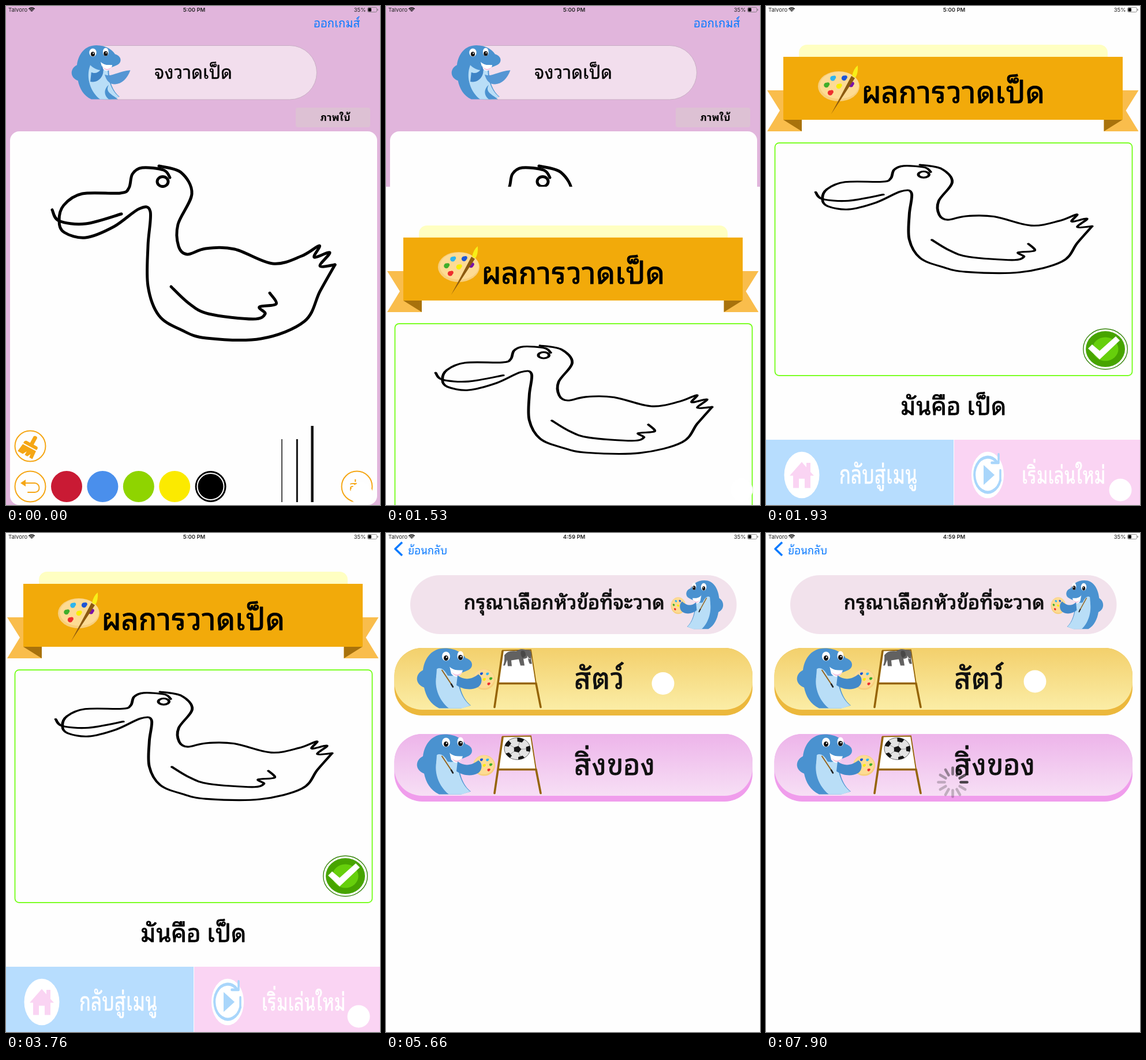
Recreate the animation shown at these times as an HTML page with a canvas. Size 648 px wide and 864 px high, loop 8 s.

```html
<!DOCTYPE html>
<html lang="th">
<head>
<meta charset="utf-8">
<style>
html, body { margin: 0; width: 100%; height: 100%; overflow: hidden; background: #fefefe; }
canvas { display: block; width: 648px; height: 864px; }
</style>
</head>
<body>
<canvas id="stage" width="648" height="864"></canvas>
<script>
const c = document.getElementById('stage').getContext('2d');
const LOOP = 8000, CUT = 5360, SLIDE = 1415, TAU = Math.PI * 2;
const THAI = "'Noto Sans Thai Looped','Noto Looped Thai',Loma,Garuda,'Noto Sans Thai','Noto Sans',sans-serif";
const LATIN = 'Inter,Roboto,sans-serif';
const WHITE = '#fefefe', BLUE = '#4a92d0', SKY = '#b9def7', ORANGE = '#f5a614', LINK = '#0a7aff';

function fill(color, d) { c.fillStyle = color; c.fill(new Path2D(d)); }
function line(color, w, d) { c.strokeStyle = color; c.lineWidth = w; c.stroke(new Path2D(d)); }
function rect(color, x, y, w, h) { c.fillStyle = color; c.fillRect(x, y, w, h); }
function paint(color, edge, w) {
  if (color) { c.fillStyle = color; c.fill(); }
  if (edge) { c.strokeStyle = edge; c.lineWidth = w; c.stroke(); }
}
function oval(x, y, rx, ry, color, edge, w = 2) {
  c.beginPath();
  c.ellipse(x, y, Math.abs(rx), ry, 0, 0, TAU);
  paint(color, edge, w);
}
function box(x, y, w, h, r, color, edge, lw = 1) {
  c.beginPath();
  c.roundRect(x, y, w, h, r);
  paint(color, edge, lw);
}
function group(x, y, sx, sy, draw) {
  c.save();
  c.translate(x, y);
  c.scale(sx, sy);
  draw();
  c.restore();
}

function text(s, x, y, size, { color = '#000', weight = 400, align = 'left', family = THAI, heavy = 0 } = {}) {
  c.font = `${weight} ${size}px ${family}`;
  c.fillStyle = c.strokeStyle = color;
  c.lineWidth = heavy;
  const put = (str, px, py) => {
    c.fillText(str, px, py);
    if (heavy) c.strokeText(str, px, py);
  };
  // A tone mark above a vowel is lifted clear of it
  const stacked = /([ก-ฮ])([ิีึืั])([่้])/;
  const hit = s.match(stacked), plain = s.replace(stacked, '$1$2');
  const width = c.measureText(plain).width;
  const left = x - (align === 'center' ? width / 2 : align === 'right' ? width : 0);
  put(plain, left, y);
  if (!hit) return;
  c.save();
  c.beginPath();
  c.rect(left, y - size * 2, width, size * 1.11);
  c.clip();
  put(hit[1] + hit[3], left + c.measureText(s.slice(0, hit.index)).width, y - size * .2);
  c.restore();
}

// Smooth path through a few "x,y" points
function curve(list) {
  const p = list.split(' ').map(s => s.split(',').map(Number));
  const at = i => p[Math.max(0, Math.min(p.length - 1, i))];
  let d = `M${p[0]}`;
  for (let i = 0; i < p.length - 1; i++) {
    const [a, b, e, f] = [at(i - 1), at(i), at(i + 1), at(i + 2)];
    const k = j => [b[j] + (e[j] - a[j]) / 6, e[j] - (f[j] - b[j]) / 6];
    const [x1, x2] = k(0), [y1, y2] = k(1);
    d += `C${x1},${y1} ${x2},${y2} ${e}`;
  }
  return d;
}
const front = curve('284,297 273,284 236,280 219,291 213,315 198,324 132,325 100,345 92,372 101,392 138,401 187,382 231,351 250,356 246,415 246,485 265,536 304,561 347,575 442,576 517,546 544,494 570,448');
const back = curve('570,448 544,450 561,427 534,435 543,415 512,433 462,446 396,421 346,420 314,430 299,416 298,378 322,325 303,288 265,277');
const mouth = curve('80,353 92,372 138,377 200,360');
const wing = curve('286,486 317,515 351,533 428,542 449,533 439,521 468,516 457,497');
function drawDuck() {
  for (const d of [front, back, mouth, wing]) line('#000', 5, d);
  oval(271.5, 304, 9.5, 8.5, null, '#000', 5);
}

function statusBar(clock) {
  const small = { color: '#222', family: LATIN };
  text('Talvoro', 4, 10, 9.5, small);
  c.lineCap = 'butt';
  for (const r of [2, 4.6, 7.2]) {
    c.beginPath();
    c.arc(44.5, 10.3, r, -TAU * .375, -TAU * .125);
    paint(null, '#111', 1.7);
  }
  c.lineCap = 'round';
  text(clock, 326, 10, 9.5, { ...small, weight: 600, align: 'center' });
  text('35%', 623.5, 10, 9.5, { ...small, align: 'right' });
  box(626.5, 2.5, 16, 8, 2, null, '#777', .8);
  box(627.5, 3.5, 5.5, 6, 1, '#000');
  box(643.5, 5, 1.2, 3, .6, '#777');
}

function palette(x, y, rx, ry) {
  oval(x, y, rx, ry, '#f8cf7c');
  oval(x + rx * .03, y - ry * .06, Math.abs(rx) * .94, ry * .9, '#fddb94');
  const r = Math.abs(rx) * .12;
  const blob = (color, u, v) => {
    oval(x + rx * u, y + ry * v, r, r, color);
    oval(x + rx * u + r * .6, y + ry * v - r * .4, r * .7, r * .7, color);
  };
  ['#ee2e2e', '#3fae2a', '#2fb5ee', '#1d55d6', '#7a12a8'].forEach((color, i) => {
    const a = (.37 + i * .15) * TAU;
    blob(color, .6 * Math.cos(a), .6 * Math.sin(a));
  });
  blob('#f9ee00', 0, 0);
}

function dolphin(painter) {
  const shift = painter ? 0 : -9;
  fill(BLUE, 'M102 200C122 200 134 210 138 217C152 221 152 234 142 238C136 241 130 243 126 244C126 270 134 289 147 299L130 304H92C77 297 69 283 66 268C50 262 50 245 64 238C67 216 80 200 102 200Z');
  fill(SKY, 'M90 238C80 264 92 291 109 304H132L146 299C130 287 124 264 124 246C112 250 100 248 90 238Z');
  fill('#fff', 'M110 231C118 240 130 239 133 234C134 247 121 255 113 244Z');
  fill('#f5c3df', 'M114 241C120 248 129 246 132 240C129 250 119 251 114 241Z');
  fill(BLUE, 'M105 224C112 216 132 212 143 222C148 231 142 237 132 238C118 238 110 236 105 224Z');
  for (const [x, y, rx] of [[104, 214, 7], [129, 213, 5.5]]) {
    oval(x + shift, y, rx, 8, '#fff');
    oval(x + shift, y + 3, 4, 4.5, '#111');
    oval(x + shift + 1, y + 1.5, 1.2, 1.2, '#fff');
  }
  if (painter) {
    palette(170, 254, -19, 18);
    fill('#4289c9', 'M124 247C137 257 150 253 160 245C168 250 167 262 160 267C148 274 132 271 122 264Z');
    fill(SKY, 'M88 236C97 230 108 244 111 260C103 268 91 262 87 250Z');
    line('#94631c', 2, 'M97 238L113 262');
    line('#222', 2.6, 'M113 262L116 267');
  } else {
    fill('#3f84c6', 'M92 252C105 258 114 244 112 238C122 254 108 274 90 270Z');
    fill('#5596d4', 'M118 256C132 262 142 250 168 248C162 264 152 274 138 275C128 275 121 268 118 256Z');
    fill(BLUE, 'M126 276C118 290 132 294 144 304H126C116 296 116 284 126 276Z');
  }
}

function drawScene(t) {
  rect('#e1b5dc', 0, 0, 648, 864);
  text('ออกเกมส์', 533, 37, 20.4, { color: LINK });
  box(125, 68.5, 413.5, 93.5, 47, '#f2deed', '#c8aec4');
  rect('#e1b5dc', 113, 66, 37, 98);
  group(114, 68, .89, .9, () => { c.translate(-54, -200); dolphin(false); });
  text('จงวาดเป็ด', 324.5, 126, 31.3, { align: 'center', heavy: .4 });
  box(502, 176, 129, 34, 4, '#ddc1d4');
  text('ภาพใบ้', 570.5, 199, 17, { weight: 600, align: 'center' });
  box(7, 217, 636, 647, 16, WHITE);
  drawDuck();
  for (const y of [762, 832]) oval(42, y, 26.5, 26.5, null, ORANGE);
  group(42, 762, 1, 1, () => {
    c.rotate(.5);
    fill(ORANGE, 'M-3-18Q1-22 4-18V-5H11Q14-4 13 1H-13Q-14-4-10-5H-3ZM-13 3H13L14 18H8L7 12L4 18H-1V11L-5 18H-15Z');
  });
  line(ORANGE, 2, 'M30 826H50C60 827 60 842 50 842H38');
  fill(ORANGE, 'M25 826L34 820V832Z');
  ['#c91a34', '#4a8fec', '#8fd400', '#fbea00', '#000'].forEach((color, i) =>
    oval(105 + i * 62.4, 832, 27, 27, color));
  oval(354.5, 832, 23, 23, null, WHITE, 2);
  for (let i = 0; i < 3; i++) {
    const top = i < 2 ? 750 : 727, w = 1.5 + i * 1.5;
    rect('#111', 478 + i * 26.3 - w / 2, top, w, 859 - top);
  }
  c.globalAlpha = t > 630 && t < 770 ? .3 : 1;
  oval(608, 832, 26.5, 26.5, null, ORANGE);
  text('ส่ง', 608, 840, 24, { color: ORANGE, align: 'center' });
  c.globalAlpha = 1;
}

function ribbonEnd() {
  fill('#f9bd4c', 'M2 146H62V217H2L24 181Z');
  fill('#a8720c', 'M30 197H62V217Z');
}
function resultScene(top) {
  c.save();
  c.translate(0, top);
  rect(WHITE, 0, 0, 648, 864);
  box(57, 67, 535, 40, 14, '#ffffc2');
  ribbonEnd();
  group(647.5, 0, -1, 1, ribbonEnd);
  rect('#f2aa0a', 30, 88, 588, 109);
  palette(126, 139, 36, 26);
  fill('#8c5a10', 'M113 187L148 121L154 125Z');
  fill('#f8ef18', 'M149 121Q152 108 159 103Q160 116 155 124Z');
  text('ผลการวาดเป็ด', 166, 168, 52.5, { heavy: 1.1 });

  box(15.5, 237.2, 619, 402.6, 7, null, '#6bff0a', 1.7);
  group(7.8, 102.7, .9776, .622, drawDuck);
  oval(588, 594, 38.3, 35, '#fff', '#37850c', 1.4);
  oval(588, 594, 34, 31, '#47a400');
  oval(588, 594, 22.5, 20.5, '#66cf0b');
  fill('#fff', 'M558 593L565 586L578 597L606 572L613 579L578 612Z');
  text('มันคือ เป็ด', 324.5, 708, 41.8, { align: 'center', heavy: .9 });

  rect('#b7ddfe', 0, 751, 325, 113);
  rect('#fad4f3', 326, 751, 322, 113);
  // Button art is taller than wide
  group(0, 812, 1, 1.32, () => {
    const label = { color: '#fff', heavy: .5 };
    oval(62, 0, 30.5, 30.5, '#fff');
    fill('#fad4f3', 'M41 1L62-17L70-10V-16H77V-4L83 1H77V17H67V5H57V17H47V1Z');
    oval(384, 0, 28, 30.5, '#fff');
    line('#a9d6fb', 4, 'M400-17A23 23 0 1 0 406 7');
    line('#a9d6fb', 3.5, 'M391-16H403V-27M406 7V-6');
    fill('#a9d6fb', 'M377-13L396 0L377 13Z');
    text('กลับสู่เมนู', 127, 11, 33.2, label);
    text('เริ่มเล่นใหม่', 443, 11, 30.5, label);
  });
  c.restore();
}

function row(y, base, from, to, label, picture, down) {
  const g = c.createLinearGradient(0, y, 0, y + 107);
  g.addColorStop(0, from);
  g.addColorStop(1, to);
  box(14.5, y, 620.5, 117, 48, base);
  box(14.5, y, 620.5, 107, 48, g);
  group(0, y - 199.5, 1, 1, () => {
    dolphin(true);
    c.lineJoin = 'miter';
    fill('#fff', 'M202 204L251 203L260 261H194Z');
    line('#956407', 1.8, 'M202 204L251 203L260 261');
    line('#956407', 3.6, 'M202 205L194 261H260M194 261L188 302M260 261L268 302');
    c.lineJoin = 'round';
    picture();
    text(label, 326, 270, 49.5, { color: '#111', heavy: 1 });
  });
  if (down) box(14.5, y, 620.5, 117, 48, 'rgba(0,0,0,.35)');
}
function elephant() {
  fill('#626161', 'M205 212Q211 203 226 205Q233 199 243 203Q252 201 252 211Q251 221 253 227H249Q246 222 246 215Q241 219 238 218L240 230H233L230 219L217 221L218 231H211L210 220L206 230H203Q206 222 205 212Z');
  fill('#484747', 'M234 205Q242 202 242 213L237 217Q232 212 234 205Z');
  line('#ddd', 1.2, 'M245 214Q247 219 250 218');
}
function ball() {
  const fifth = i => i * TAU / 5 - 1.3;
  const patch = (x, y) => {
    c.beginPath();
    for (let k = 0; k < 5; k++) c.lineTo(x + 7 * Math.cos(fifth(k)), y + 6 * Math.sin(fifth(k)));
    paint('#161616');
  };
  c.save();
  oval(227.5, 225, 22.5, 19, '#e3e3e3', '#444', .8);
  c.clip();
  for (let i = 0; i < 5; i++) {
    const x = 227.5 + 21 * Math.cos(fifth(i)), y = 226 + 18 * Math.sin(fifth(i));
    line('#888', .8, `M227.5 226L${x} ${y}`);
    patch(x, y);
  }
  patch(227.5, 226);
  c.restore();
}
function spinner(t) {
  const step = Math.floor((t - 7900) / 83.33);
  for (let i = 0; i < 12; i++) {
    const a = (step - i) * TAU / 12, u = Math.cos(a), v = Math.sin(a);
    const k = Math.max(.24, .78 - i * .09);
    line(`rgba(20,20,20,${k})`, 4.6, `M${323.5 + u * 14} ${431.5 + v * 14}L${323.5 + u * 25} ${431.5 + v * 25}`);
  }
}
function topicScene(t) {
  rect(WHITE, 0, 0, 648, 864);
  c.lineCap = 'butt';
  line(LINK, 3.6, 'M28 16L16 27.5L28 39');
  c.lineCap = 'round';
  text('ย้อนกลับ', 38, 37, 18.6, { color: LINK });
  box(42, 73, 565.5, 102, 51, '#f2e2ec');
  text('กรุณาเลือกหัวข้อที่จะวาด', 135, 132, 34, { color: '#111', heavy: 1.2 });
  group(584, 82, -.67, .81, () => { c.translate(-54, -200); dolphin(true); });
  row(199, '#ecb83c', '#f3d06c', '#fbeda6', 'สัตว์', elephant, t >= 7230 && t < 7430);
  row(348, '#f09dec', '#edb4ea', '#f7dff5', 'สิ่งของ', ball, false);
  if (t >= 7480) spinner(t);
}

// Moves are [start, end, dx, dy], eased and added up
function drawTouch(t, x, y, moves) {
  for (const [start, end, dx, dy] of moves) {
    const u = Math.max(0, Math.min(1, (t - start) / (end - start)));
    const s = u * u * (3 - 2 * u);
    x += dx * s;
    y += dy * s;
  }
  oval(x, y, 19.5, 19.5, '#fff');
}
const sendMoves = [[330, 800, 0, -7], [1660, 1930, -2, 0], [3430, 3760, -3, -1], [4000, 4260, 3, 2], [4530, 5000, -38, -19]];
const topicMoves = [[CUT, 5960, -8, -13], [6430, 6900, -7, 3], [7430, 7900, -3, 0]];

function render(t) {
  c.lineCap = c.lineJoin = 'round';
  if (t < CUT) {
    const x = Math.max(0, (t - SLIDE) * .0187);
    const top = 864 * (1 + x) * Math.exp(-x);
    if (top > 1) drawScene(t);
    if (t > SLIDE) resultScene(top > 1 ? top : 0);
    statusBar('5:00 PM');
    drawTouch(t, 616, 845, sendMoves);
  } else {
    topicScene(t);
    statusBar('4:59 PM');
    drawTouch(t, 484, 267, topicMoves);
  }
}
function tick(now) {
  render(now % LOOP);
  requestAnimationFrame(tick);
}
render(0);
requestAnimationFrame(tick);
</script>
</body>
</html>
```
